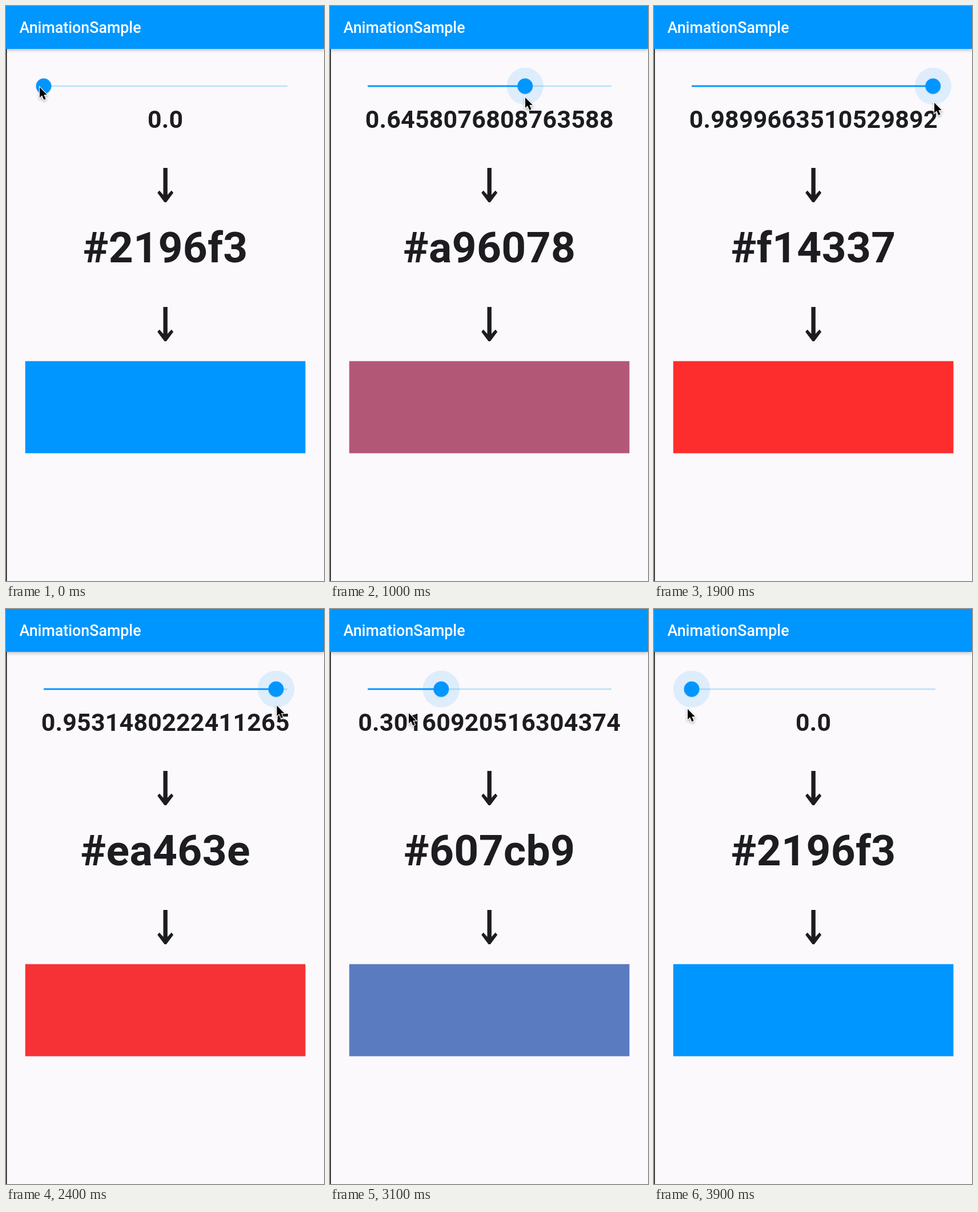
Write an HTML page with a canvas that moves like this. It is 557 px wide and 1005 px high and loops after 4000 ms.

```html
<!DOCTYPE html>
<html lang="en">
<head>
<meta charset="utf-8">
<title>AnimationSample</title>
<style>
  html, body { margin: 0; width: 100%; height: 100%; overflow: hidden; background: #fbf9fc; }
  canvas { display: block; width: 557px; height: 1005px; }
</style>
</head>
<body>
<canvas id="stage" width="557" height="1005"></canvas>
<script>
const ctx = document.getElementById('stage').getContext('2d');
const LOOP = 4000, STEP = 100;
const BLUE = '#0096ff', INK = '#1d1c20';
const CENTER = 279.2;
const TRACK = { left: 66, width: 427, y: 140 };

// The drag: [time, slider value, pointer x, pointer y]
const DRAG = [
  [300, 0, 59, 142],
  [700, 0.2237097698709239, 247, 162],
  [1000, 0.6458076808763588, 342, 160],
  [1900, 0.9899663510529892, 491, 169],
  [2000, 1, 497, 169],
  [2300, 1, 497, 169],
  [2700, 0.5978022036345112, 300, 169],
  [3100, 0.30160920516304374, 138, 182],
  [3500, 0, 59, 175]
];

const clamp = (n, low, high) => Math.min(high, Math.max(low, n));
const mix = (a, b, u) => a + (b - a) * u;

function slope(i, column) {
  const [before, here, after] = [DRAG[i - 1], DRAG[i], DRAG[i + 1]];
  if (!before || !after) return 0;
  const a = (here[column] - before[column]) / (here[0] - before[0]);
  const b = (after[column] - here[column]) / (after[0] - here[0]);
  return a * b > 0 ? 2 * a * b / (a + b) : 0;
}

// Monotone cubic through the drag points, held at both ends
function dragAt(time, column) {
  const last = DRAG.length - 1;
  if (time >= DRAG[last][0]) return DRAG[last][column];
  const i = Math.max(0, DRAG.findIndex(key => key[0] > time) - 1);
  const span = DRAG[i + 1][0] - DRAG[i][0];
  const u = Math.max(0, (time - DRAG[i][0]) / span);
  const start = DRAG[i][column], rise = DRAG[i + 1][column] - start;
  return start + rise * u * u * (3 - 2 * u)
    + span * u * (1 - u) * (slope(i, column) * (1 - u) - slope(i + 1, column) * u);
}

function hexOf(value) {
  const start = [0x21, 0x96, 0xf3], end = [0xf4, 0x43, 0x36];
  return '#' + start.map((n, i) =>
    Math.floor(mix(n, end[i], value)).toString(16).padStart(2, '0')).join('');
}

function swatchOf(value) {
  const start = [0, 150, 255], end = [255, 44, 44], bulge = [62, 22, 0];
  const rgb = start.map((n, i) =>
    Math.round(mix(n, end[i], value) + bulge[i] * value * (1 - value)));
  return `rgb(${rgb.join()})`;
}

function rect(x, y, w, h, color) {
  ctx.fillStyle = color;
  ctx.fillRect(x, y, w, h);
}

function disc(x, y, radius, color) {
  ctx.fillStyle = color;
  ctx.beginPath();
  ctx.arc(x, y, radius, 0, Math.PI * 2);
  ctx.fill();
}

function polygon(points) {
  ctx.beginPath();
  points.forEach(([x, y]) => ctx.lineTo(x, y));
  ctx.closePath();
}

function shadow(alpha, blur, offset) {
  ctx.shadowColor = `rgba(0,0,0,${alpha})`;
  ctx.shadowBlur = blur;
  ctx.shadowOffsetY = offset;
}

function label(text, x, y, weight, size, color, align, spacing) {
  ctx.font = `${weight} ${size}px Roboto, sans-serif`;
  ctx.letterSpacing = spacing + 'px';
  ctx.textAlign = align;
  ctx.fillStyle = color;
  ctx.fillText(text, x, y);
}

function drawArrow(top) {
  const half = [[3.7, 0], [3.7, 47], [10.6, 39.5], [14, 43.5], [1.6, 60]];
  const mirrored = half.map(([x, y]) => [-x, y]).reverse();
  polygon([...half, ...mirrored].map(([x, y]) => [CENTER + x, top + y]));
  ctx.fillStyle = INK;
  ctx.fill();
}

function drawHeader() {
  ctx.save();
  shadow(0.25, 6, 2);
  rect(0, 0, 557, 75, BLUE);
  ctx.restore();
  label('AnimationSample', 23.5, 47, 500, 26.8, '#fff', 'left', 0);
}

function drawSlider(value, halo) {
  const x = TRACK.left + TRACK.width * value;
  rect(TRACK.left, TRACK.y - 1.3, TRACK.width, 2.6, '#b9e2f8');
  rect(TRACK.left, TRACK.y - 1.4, x - TRACK.left, 2.8, BLUE);
  disc(x, TRACK.y, halo, 'rgba(0,150,255,.12)');
  ctx.save();
  shadow(0.15, 2, 1);
  disc(x, TRACK.y, 13.4, BLUE);
  ctx.restore();
}

function drawPointer(x, y) {
  ctx.save();
  ctx.translate(x, y);
  ctx.scale(0.88, 0.88);
  polygon([[0, 0], [0, 20.5], [4.6, 16.2], [8.3, 24.8], [12, 23.2], [8.4, 14.8], [14.6, 14.8]]);
  shadow(0.35, 4, 2);
  ctx.strokeStyle = '#fff';
  ctx.lineWidth = 2.6;
  ctx.stroke();
  ctx.shadowColor = 'transparent';
  ctx.fillStyle = '#000';
  ctx.fill();
  ctx.restore();
}

function draw(time) {
  const value = clamp(dragAt(time, 1), 0, 1);
  const halo = 32.2 * clamp((time - 200) / 300, 0, 1);
  const number = Number.isInteger(value) ? value.toFixed(1) : String(value);

  rect(0, 0, 557, 1005, '#fbf9fc');
  rect(0, 0, 1.4, 1005, '#000');
  drawHeader();
  drawSlider(value, halo);
  label(number, CENTER, 213, 700, 42.9, INK, 'center', 0.24);
  drawArrow(283);
  label(hexOf(value), CENTER, 448, 700, 75, INK, 'center', 0.33);
  drawArrow(526);
  rect(33.7, 620.7, 490.8, 161, swatchOf(value));
  drawPointer(dragAt(time, 2), dragAt(time, 3));
}

const origin = performance.now();
function tick() {
  const time = (performance.now() - origin) % LOOP;
  draw(Math.floor(time / STEP) * STEP);
  requestAnimationFrame(tick);
}
tick();
</script>
</body>
</html>
```
